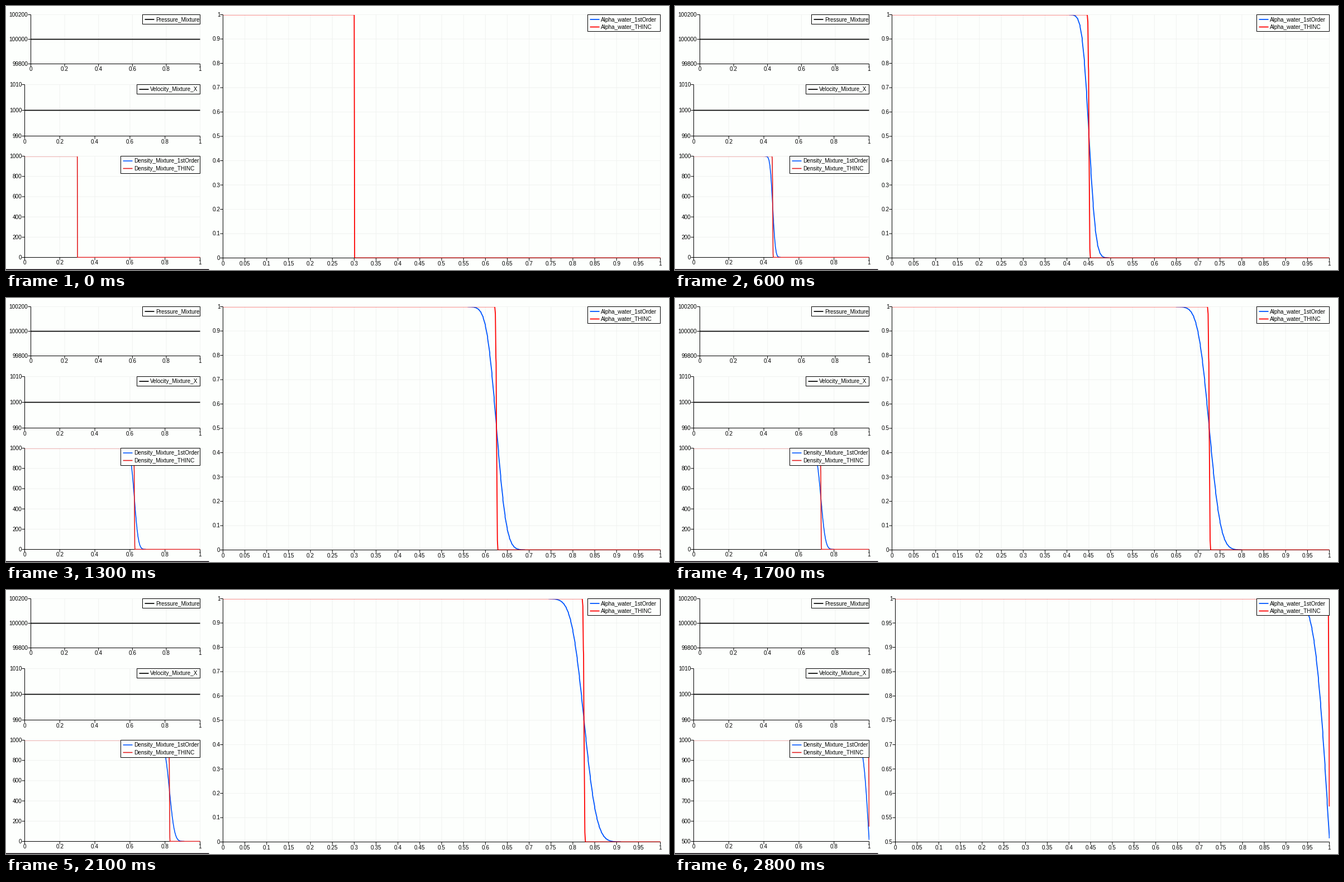
Write a matplotlib script that moves like this. It is 1187 by 472 pixels and loops after 2900 ms.

```python
import math

import matplotlib.pyplot as plt
import numpy as np
from matplotlib.animation import FuncAnimation
from matplotlib.patches import Rectangle

W, H, DPI = 1187, 472, 64
PT = 72 / DPI  # points per pixel
FRAMES, INTERVAL = 29, 100

PAPER, GRID, BLACK = "#fdfffd", "#f1f3f1", "#000000"
BLUE, RED, DULL_RED = "#0055ff", "#ff0000", "#e31a1c"
CELL = 0.005

plt.rcParams["font.family"] = "Liberation Sans"
fig = plt.figure(figsize=(W / DPI, H / DPI), dpi=DPI, facecolor=PAPER)
ax = fig.add_axes([0, 0, 1, 1])


def stroke(xs, ys, color=BLACK, width=1.0, z=2, **kw):
    # coordinates are already pixel centres, so snapping would shift them
    return ax.plot(xs, ys, color=color, lw=width * PT, zorder=z, snap=False,
                   solid_capstyle="butt", solid_joinstyle="round", **kw)[0]


def label(x, y, text, ha):
    ax.text(x, y, text, ha=ha, va="baseline", fontsize=10 * PT,
            color=BLACK, zorder=8)


class Panel:
    """A chart placed by pixel edges, with x running from 0 to 1."""

    def __init__(self, left, top, right, bottom, low, high, x_step, y_step):
        self.box = left, top, right, bottom
        self.low, self.high = low, high
        self.draw_axes(x_step, y_step)

    def px(self, x):
        left, _, right, _ = self.box
        return left + np.asarray(x) * (right - left)

    def py(self, y):
        _, top, _, bottom = self.box
        share = (np.asarray(y) - self.low) / (self.high - self.low)
        return bottom - share * (bottom - top)

    def draw_axes(self, x_step, y_step):
        left, top, right, bottom = self.box
        for k in range(round(1 / x_step) + 1):
            x = self.px(k * x_step)
            stroke([x, x], [top, bottom], GRID, z=1)
            stroke([x, x], [bottom, bottom + 5])
            label(x, bottom + 13, f"{k * x_step:.6g}", "center")
        for k in range(round((self.high - self.low) / y_step) + 1):
            value = self.low + k * y_step
            y = self.py(value)
            stroke([left, right], [y, y], GRID, z=1)
            stroke([left - 5, left], [y, y])
            label(left - 5, y + 3.5, f"{value:.6g}", "right")
        stroke([left, left], [top, bottom + 0.5])
        stroke([left, right], [bottom, bottom])

    def curve(self, xs, ys, color, width, z):
        left, top, right, bottom = self.box
        line = stroke(self.px(xs), self.py(ys), color, width, z)
        # the top half of a line along the upper edge is cut off
        line.set_clip_path(Rectangle(
            (left - 0.5, bottom + 0.5), right - left + 1, top - bottom,
            transform=ax.transData))

    def level(self, value):
        y = self.py(value)
        stroke(self.box[::2], [y, y], width=1.7, z=3)

    def legend(self, left, height, entries, width):
        _, top, right, _ = self.box
        ax.add_patch(Rectangle((left, top), right - left, height, fc=PAPER,
                               ec=BLACK, lw=PT, zorder=6, snap=False))
        for k, (text, color) in enumerate(entries):
            y = top + 8.5 + 13.5 * k
            stroke([left + 4, left + 21], [y, y], color, width, 7)
            label(left + 23.5, y + 3.5, text, "left")


def sharp_front(i):
    """Interface kept within about one cell."""
    center = 0.3 + 0.025 * i
    if i == 0:
        offsets, values = [0, 0.001], [1, 0]
    else:
        offsets = [-0.0036, -0.0022, -0.001, -0.0005, 0, 0.0024, 0.0036]
        values = [1, 0.97, 0.79, 0.77, 0.573, 0.04, 0]
    knots = center + np.array(offsets)
    xs = np.concatenate([[0], knots[knots < 1], [1]])
    return xs, np.interp(xs, knots, values)


def smeared_front(i):
    """First-order interface, diffusing with the square root of time."""
    if i == 0:
        return sharp_front(0)
    center, sigma = 0.3005 + 0.025 * i, 0.00497 * math.sqrt(i)
    xs = np.arange(201) * CELL
    v = np.array([0.5 * math.erfc((x - center) / (sigma * math.sqrt(2)))
                  for x in xs])
    # small jump at each cell face
    before = v + 0.06 * (np.concatenate([v[:1], v[:-1]]) - v)
    after = v + 0.06 * (np.concatenate([v[1:], v[-1:]]) - v)
    return np.repeat(xs, 2), np.column_stack([before, after]).ravel()


def mixed_part(xs, ys):
    """Leave out the flat ends, which the sharp curve covers."""
    mixed = (ys > 1e-4) & (ys < 1 - 1e-4)
    return xs[mixed], ys[mixed]


def nice_range(lowest, coarse):
    """Axis start and tick step for data reaching from lowest to 1."""
    if lowest > 0.5:
        return 0.5, coarse / 2
    return math.floor(lowest / coarse + 1e-9) * coarse, coarse


def draw(i):
    ax.cla()
    ax.set(xlim=(0, W), ylim=(H, 0))
    ax.axis("off")
    ax.add_patch(Rectangle((0, 470.5), 363.5, 1.5, fc="#080008", lw=0,
                           snap=False))

    pressure = Panel(44.5, 15.5, 347.5, 103.5, 99800, 100200, 0.2, 200)
    pressure.level(100000)
    pressure.legend(244.5, 17, [("Pressure_Mixture", BLACK)], 1.7)

    velocity = Panel(33.5, 140.5, 347.5, 232.5, 990, 1010, 0.2, 10)
    velocity.level(1000)
    velocity.legend(234.5, 17, [("Velocity_Mixture_X", BLACK)], 1.7)

    sharp, smeared = sharp_front(i), smeared_front(i)
    lowest = min(smeared[1][-1], sharp[1][-1])
    smeared = mixed_part(*smeared)

    low, step = nice_range(lowest, 0.2)
    density = Panel(33.5, 268.5, 347.5, 449.5, 1000 * low, 1000,
                    0.2, 1000 * step)
    density.curve(smeared[0], 1000 * smeared[1], BLUE, 1.6, 3)
    density.curve(sharp[0], 1000 * sharp[1], DULL_RED, 1.6, 4)
    density.legend(205.5, 31, [("Density_Mixture_1stOrder", BLUE),
                               ("Density_Mixture_THINC", DULL_RED)], 1.6)

    low, step = nice_range(lowest, 0.1)
    left = 388.5 if step > 0.07 else 394.5  # wider labels need more room
    alpha = Panel(left, 15.5, 1171.5, 450.5, low, 1, 0.05, step)
    alpha.curve(*smeared, BLUE, 1.8, 3)
    alpha.curve(*sharp, RED, 1.8, 4)
    stroke([left, 1171.5], [450.5, 450.5], z=5, alpha=0.5)
    alpha.legend(1041.5, 30, [("Alpha_water_1stOrder", BLUE),
                              ("Alpha_water_THINC", RED)], 1.8)
    return []


anim = FuncAnimation(fig, draw, frames=FRAMES, interval=INTERVAL,
                     init_func=lambda: [], repeat=True, repeat_delay=0)
plt.show()
```
